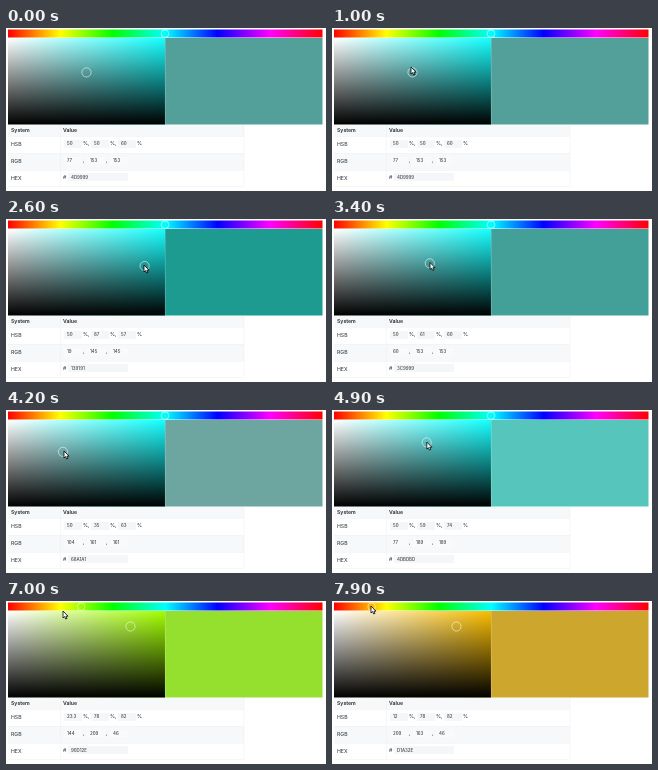
Recreate the animation shown at these times as an HTML page. Size 320 by 163 pixels, loop 8 s.

```html
<!DOCTYPE html>
<html lang="en">
<head>
<meta charset="utf-8">
<title>Colour picker</title>
<style>
  html, body { margin: 0; width: 100%; height: 100%; overflow: hidden; background: #fff; }
  svg { display: block; width: 100vw; height: 100vh; }
  text { font: 5.2px Inter, Arial, sans-serif; fill: #24292e; }
  .head { font-weight: 600; }
  .field { font-size: 4.4px; font-weight: 500; fill: #444; }
  .ring { fill: none; stroke: #fff; stroke-opacity: .55; }
</style>
</head>
<body>
<svg viewBox="0 0 320 163">
  <defs>
    <linearGradient id="hues"></linearGradient>
    <linearGradient id="sat"><stop stop-color="#fff"/><stop id="pure" offset="1"/></linearGradient>
    <linearGradient id="dark" x2="0" y2="1"><stop stop-opacity="0"/><stop offset="1"/></linearGradient>
  </defs>
  <rect x="2" y="1.5" width="314.5" height="8" fill="url(#hues)"/>
  <rect x="2" y="10" width="157" height="86.5" fill="url(#sat)"/>
  <rect x="2" y="10" width="157" height="86.5" fill="url(#dark)"/>
  <rect id="swatch" x="159" y="10" width="157.5" height="86.5"/>
  <path d="M159.3 96V10" stroke="#fff" stroke-width=".6" stroke-opacity=".35"/>
  <circle id="hueRing" class="ring" cy="5.7" r="3.8"/>
  <circle id="ring" class="ring" r="4.6"/>
  <g id="table">
    <path d="M2 97H238V108H2ZM2 125H238V142H2Z" fill="#f6f8fa"/>
    <path d="M2 108.5H238M2 125.5H238M2 142.5H238M2 158.5H238M54.5 97V158M238 97V158" stroke="#eceef1" stroke-width=".5"/>
    <path d="M58 112h18v8h-18zM85 112h18v8h-18zM112 112h18v8h-18zM62 145h60v8h-60z" fill="#f5f6f8"/>
    <path d="M58 129h18v8h-18zM81 129h18v8h-18zM104 129h18v8h-18z" fill="#f9fafb"/>
  </g>
  <path id="cursor" d="M0 0V7L1.6 5.6 2.7 8 4 7.4 2.9 5.2H5Z" fill="#fff" stroke="#000" stroke-width=".8"/>
</svg>
<script>
const $ = id => document.getElementById(id);
const NS = 'http://www.w3.org/2000/svg';

function add(parent, tag, attrs, text = '') {
  const el = document.createElementNS(NS, tag);
  for (const k in attrs) el.setAttribute(k, attrs[k]);
  el.textContent = text;
  parent.append(el);
  return el;
}
const label = (x, y, text, cls = '') => add($('table'), 'text', { x, y, class: cls }, text);
const fields = (y, ...xs) => xs.map(x => label(x, y, '', 'field'));

for (let i = 0; i < 7; i++)
  add($('hues'), 'stop', { offset: i / 6, 'stop-color': `hsl(${i * 60} 100% 50%)` });

label(5, 104.3, 'System', 'head');
label(57, 104.3, 'Value', 'head');
label(5, 118.2, 'HSB');
label(5, 134.8, 'RGB');
label(5, 151.7, 'HEX');
label(77, 116.8, '%,');
label(104, 116.8, '%,');
label(131, 116.8, '%');
label(76.8, 133.7, ',');
label(99.8, 133.7, ',');
label(57, 150.6, '#');
const hsbFields = fields(116.8, 61, 88, 115);
const rgbFields = fields(133.7, 61, 84, 107);
const [hexField] = fields(150.6, 65);

// Keys are [time, ...values]; values ease from key to key.
const picks = [[0, .5, .6], [1700, .5, .6], [2600, .87, .57], [4200, .35, .63], [5500, .78, .82]];
const hues = [[0, .5], [5900, .5], [6000, .395], [7000, .233], [7900, .12]];
const pointer = [[400, 100, 97], [900, 79, 39], [1000, 79, 39], [1700, 80, 43.5],
  [2600, 138, 46], [4200, 58, 41], [5500, 124, 25], [5900, 126, 7], [7000, 57, 10], [7900, 39, 5]];

function at(keys, t) {
  const i = keys.findIndex(k => k[0] > t);
  if (i < 0) return keys[keys.length - 1].slice(1);
  if (i === 0) return keys[0].slice(1);
  const [a, b] = [keys[i - 1], keys[i]];
  const p = (t - a[0]) / (b[0] - a[0]), e = p * p * (3 - 2 * p);
  return a.slice(1).map((v, j) => v + (b[j + 1] - v) * e);
}

function toRgb(h, s, b) {
  return [5, 3, 1].map(n => {
    const k = (n + h * 6) % 6;
    return Math.round(255 * b * (1 - s * Math.max(0, Math.min(k, 4 - k, 1))));
  });
}

// Slight colour shift of the display
const shown = ([r, g, b]) =>
  `rgb(${r + .08 * (g - r)} ${Math.min(255, g + .08 * (g - r) + .06 * (g - b))} ${b})`;

function place(el, x, y) {
  el.setAttribute('cx', x);
  if (y !== undefined) el.setAttribute('cy', y);
}

function draw(now) {
  const t = Math.floor(now % 8000 / 100) * 100;
  const [sat, bri] = at(picks, t).map(v => Math.round(v * 100) / 100);
  const hue = Math.round(at(hues, t)[0] * 1000) / 1000;
  const rgb = toRgb(hue, sat, bri);

  $('pure').setAttribute('stop-color', shown(toRgb(hue, 1, 1)));
  $('swatch').setAttribute('fill', shown(rgb));
  place($('ring'), 2 + 157 * sat, 10 + 86 * (1 - bri));
  place($('hueRing'), 2 + 314 * hue);

  [hue, sat, bri].forEach((v, i) => hsbFields[i].textContent = +(v * 100).toFixed(1));
  rgb.forEach((v, i) => rgbFields[i].textContent = v);
  hexField.textContent = rgb.map(v => v.toString(16).padStart(2, '0')).join('').toUpperCase();

  $('cursor').setAttribute('transform', `translate(${at(pointer, t)})`);
  $('cursor').setAttribute('visibility', t < 400 ? 'hidden' : 'visible');
}

const start = performance.now();
function loop() {
  draw(performance.now() - start);
  requestAnimationFrame(loop);
}
loop();
</script>
</body>
</html>
```
